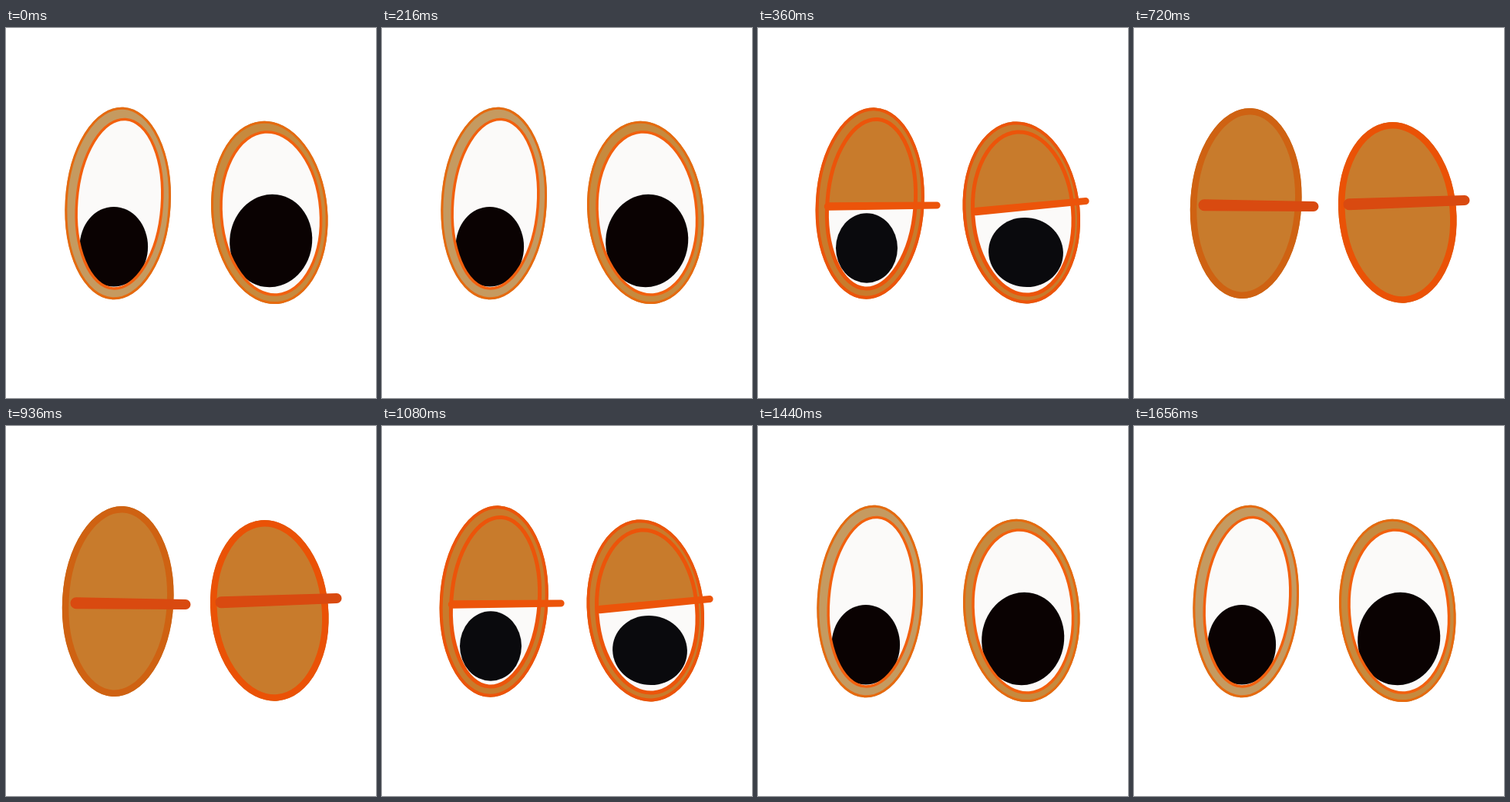
An HTML page with a canvas that plays this animation: 480 by 480 pixels, repeating every 1800 ms.

```html
<!DOCTYPE html>
<html lang="en">
<head>
<meta charset="utf-8">
<title>Blinking eyes</title>
<style>
  html, body { margin: 0; height: 100%; overflow: hidden; background: #fff; }
  canvas { display: block; }
</style>
</head>
<body>
<canvas id="stage" width="480" height="480"></canvas>
<script>
const ctx = document.getElementById('stage').getContext('2d');
const ORANGE = '#ec540a', LID = '#c87b2c', WHITE = '#fbfaf9';
const STEP = 360;
const CLOSURE = [0, 0.5, 1, 0.5, 0];

// "widen" is how much the eye broadens when shut; "lash" runs from inner to outer end.
const leftEye = {
  outer: { x: 145.2, y: 227.5, rx: 68.5, ry: 125, tilt: 3.3 },
  inner: { x: 147, y: 228.2, rx: 55.3, ry: 110, tilt: 4.4 },
  widen: 3.6,
  openPupil: { x: 139.8, y: 283.7, rx: 44.3, ry: 51.8 },
  halfPupil: { x: 141, y: 285.5, rx: 40, ry: 45.3 },
  halfLash: [91, 231.5, 232, 230],
  shutLash: [91, 229.7, 233, 231.5],
  band: '#c59a60', shutEdge: '#cf6212'
};
const rightEye = {
  outer: { x: 341.8, y: 239.4, rx: 75.3, ry: 119, tilt: -5.3 },
  inner: { x: 343.8, y: 240.5, rx: 64.4, ry: 105.8, tilt: -4.4 },
  widen: 1,
  openPupil: { x: 343.7, y: 276, rx: 53.4, ry: 60.4, tilt: 8 },
  halfPupil: { x: 347.5, y: 291, rx: 48.5, ry: 45, tilt: 10 },
  halfLash: [283, 238, 425, 224.5],
  shutLash: [279, 228.7, 429, 223.5],
  band: '#c68a3e', shutEdge: '#ea5206'
};

// Traces an oval, optionally inset so that a stroke stays inside its edge.
function trace({ x, y, rx, ry, tilt = 0 }, inset = 0) {
  ctx.beginPath();
  ctx.ellipse(x, y, rx - inset, ry - inset, tilt * Math.PI / 180, 0, 2 * Math.PI);
}

function fillOval(shape, color) {
  trace(shape);
  ctx.fillStyle = color;
  ctx.fill();
}

function ring(shape, color, width, inset = 0) {
  trace(shape, inset);
  ctx.strokeStyle = color;
  ctx.lineWidth = width;
  ctx.stroke();
}

function rim(shape, color, width) {
  ring(shape, color, width, width / 2);
}

function drawLash([x1, y1, x2, y2], r1, r2, color) {
  const quarter = Math.PI / 2;
  ctx.beginPath();
  ctx.arc(x1, y1, r1, quarter, 3 * quarter);
  ctx.arc(x2, y2, r2, -quarter, quarter);
  ctx.fillStyle = color;
  ctx.fill();
}

// Draws inside the oval, only below the line that carries the lash.
function insideBelow(shape, [x1, y1, x2, y2], draw) {
  ctx.save();
  trace(shape);
  ctx.clip();
  ctx.beginPath();
  ctx.moveTo(x1 - 4, y1);
  ctx.lineTo(x2, y2);
  ctx.lineTo(x2, 480);
  ctx.lineTo(x1 - 4, 480);
  ctx.clip();
  draw();
  ctx.restore();
}

function drawEye(eye, closure) {
  const wider = shape => ({ ...shape, rx: shape.rx + eye.widen * closure });
  const inner = wider(eye.inner);
  const outer = wider(eye.outer);
  outer.ry -= 1.4 * closure;
  fillOval(outer, closure ? LID : eye.band);

  if (closure === 1) {
    rim(outer, eye.shutEdge, 8.5);
    drawLash(eye.shutLash, 7.5, 6.5, '#d94a10');
  } else if (closure) {
    rim(outer, ORANGE, 4);
    insideBelow(inner, eye.halfLash, () => {
      fillOval(inner, WHITE);
      fillOval(eye.halfPupil, '#0a0a0d');
    });
    ring(inner, ORANGE, 5);
    drawLash(eye.halfLash, 5.2, 4.6, ORANGE);
  } else {
    rim(outer, '#e66a0f', 3);
    insideBelow(inner, [0, 0, 480, 0], () => {
      fillOval(inner, WHITE);
      fillOval(eye.openPupil, '#0a0202');
    });
    ring(inner, '#f2600e', 3.5);
  }
}

function frame() {
  const step = Math.floor(performance.now() / STEP) % CLOSURE.length;
  ctx.clearRect(0, 0, 480, 480);
  for (const eye of [leftEye, rightEye]) drawEye(eye, CLOSURE[step]);
  requestAnimationFrame(frame);
}
frame();
</script>
</body>
</html>
```
